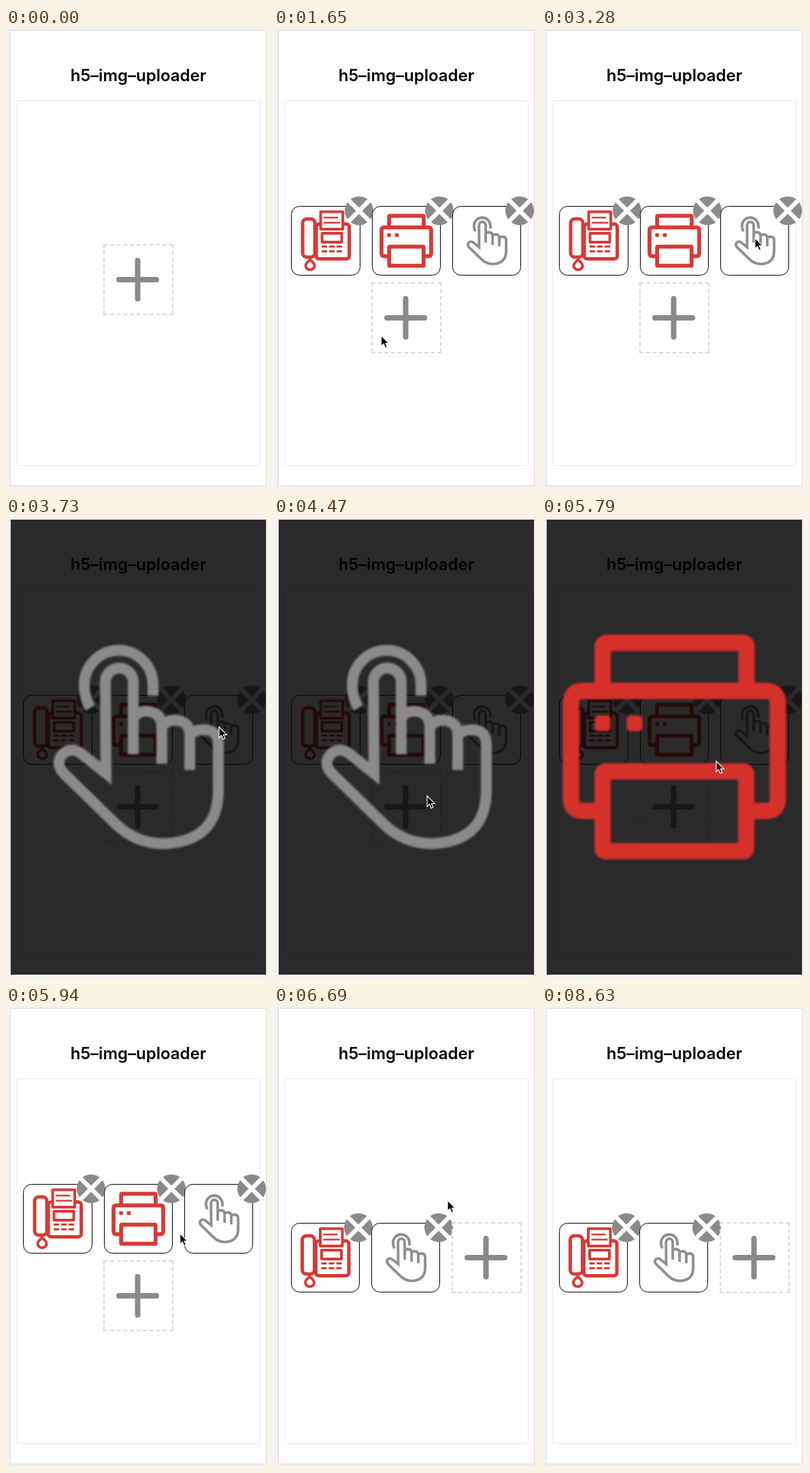
Write an HTML page that moves like this. It is 385 px wide and 676 px high and loops after 8.75 s.

```html
<!DOCTYPE html>
<html lang="en">
<head>
<meta charset="utf-8">
<title>h5-img-uploader</title>
<style>
html, body { margin: 0; width: 100%; height: 100%; overflow: hidden; background: #f2f2f2; }
svg { display: block; width: 385px; height: 676px; }
.title { font: 600 24px Inter, "Noto Sans", sans-serif; text-anchor: middle; fill: #000; }
.grey { fill: none; stroke: #8a8a8a; }
.red { fill: none; stroke: #d6302b; }
.zoomed { filter: blur(1.5px); }
.card { fill: #fefefe; stroke: #000; }
</style>
</head>
<body>
<svg viewBox="0 0 385 676">
  <defs>
    <g id="printer" class="red" stroke-width="24" stroke-linejoin="round">
      <path d="M-105.5 -82V-146Q-105.5 -152.500 -99 -152.500H100Q106 -152.500 106 -146V-82"/>
      <path d="M-106 94H-134Q-152 94 -152 76V-64Q-152 -82 -134 -82H134Q152 -82 152 -64V76Q152 94 134 94H106"/>
      <rect x="-105.5" y="36" width="211" height="117" rx="4"/>
      <path stroke-width="10" d="M-112 -41h13v13h-13zM-65 -41h13v13h-13z" fill="#d6302b"/>
    </g>
    <g id="hand" class="grey" stroke-width="16" transform="translate(-194.5 -337)">
      <path d="M124 280Q115 265 115 246A50.500 50.500 0 0 1 216 246V262"/>
      <path d="M187 348V242A20.500 20.500 0 0 0 146 242L147 376L112 348Q97 336 84 347Q71 361 85 376L160 449Q190 479 232 479Q312 476 312 400V332Q311 312 291 312Q276 312 270 320"/>
      <path d="M187 295Q193 285 206 285Q229 286 229 308V362M229 308Q235 298 248 298Q270 299 270 320V371"/>
    </g>
    <g id="fax" class="red" stroke-width="5" stroke-linejoin="round" transform="translate(-76 -312)">
      <rect x="42" y="280" width="18" height="56" rx="6"/>
      <rect x="62" y="287.500" width="48.500" height="51" rx="4"/>
      <path stroke-width="4" fill="#fefefe" d="M68.500 295V269.500H101V295Z"/>
      <path stroke-width="2.500" d="M73 278H94M73 285.500H97"/>
      <rect x="70.500" y="301" width="29" height="13" stroke-width="4"/>
      <path stroke-width="3" d="M70 320.500h8m3 0h8m3 0h8M70 327.500h8m3 0h8m3 0h8"/>
      <path stroke-width="4" d="M53 335V340Q46.500 345 46.500 348.500A6.500 6 0 0 0 59.500 348.500Q59.500 345 53 340"/>
    </g>
    <g id="remove">
      <circle r="21" fill="#8a8a8a"/>
      <path d="M-15 -15L15 15M15 -15L-15 15" stroke="#fefefe" stroke-width="6.500"/>
    </g>
    <g id="add">
      <path d="M-51.500 -51H51.500M-51.500 51H51.500M-50.500 -52V52M50.500 -52V52" stroke="#d8d8d8" stroke-width="2" stroke-dasharray="6 3.700"/>
      <path class="grey" stroke-width="8" stroke-linecap="round" d="M-28.500 0H26.500M-1 -28V28"/>
    </g>
  </defs>
  <rect x="6.500" y="3.500" width="376" height="668" fill="#fefefe" stroke="#dcdcdc"/>
  <text class="title" x="194.500" y="78">h5–img–uploader</text>
  <rect x="15.500" y="106.500" width="358" height="535" fill="none" stroke="#ececec"/>
  <g id="items"></g>
  <g id="preview">
    <rect x="7" y="4" width="375" height="667" fill="#000" fill-opacity=".835"/>
    <g class="zoomed" transform="translate(194.5 337)"><use id="previewIcon"/></g>
  </g>
  <path id="cursor" d="M0 0V15.500L3.600 12.200L6 18L8.800 16.800L6.400 11.300H11.300Z" fill="#000" stroke="#fff" stroke-width="1.200"/>
</svg>
<script>
const LOOP = 8750, STEP = 147;
const CENTER = { x: 194.5, y: 369 }, COLUMN = 118.4, ROW = 113;
const CARD = { width: 100.55, height: 101 };
const $ = id => document.getElementById(id);
const translate = (x, y) => `translate(${x} ${y})`;

const ALL = ['fax', 'printer', 'hand'];
const scenes = [
  { start: 0, icons: [] },
  { start: 1350, icons: ALL },
  { start: 3730, icons: ALL, preview: 'hand' },
  { start: 4760, icons: ALL },
  { start: 5350, icons: ALL, preview: 'printer' },
  { start: 5940, icons: ALL },
  { start: 6690, icons: ['fax', 'hand'] }
];

// The pointer rests at each goal until the next move begins.
const moves = [
  { start: 1350, steps: 6, x: 55, y: 450 },
  { start: 2690, steps: 5, x: 313, y: 308 },
  { start: 4030, steps: 4, x: 225, y: 409 },
  { start: 4910, steps: 2, x: 233, y: 377 },
  { start: 5200, steps: 5, x: 256, y: 358 },
  { start: 5940, steps: 3, x: 255, y: 285 },
  { start: 6840, steps: 4, x: 318, y: 530 },
  { start: 7430, steps: 1, x: 341, y: 656 },
  { start: 8330, steps: 2, x: 342, y: 664 }
];
const pointerShown = t => (t >= 1350 && t < 7430) || (t >= 8330 && t < 8630);

function card(icon, x, y) {
  const left = Math.floor(x - 50.5) + 0.5;
  const right = Math.floor(x - 50.5 + CARD.width) + 0.5;
  const top = y - 50.5;
  const scale = icon === 'fax' ? 1 : 0.24;
  return `<rect class="card" x="${left}" y="${top}" width="${right - left}" height="${CARD.height}" rx="12"/>
    <use href="#${icon}" opacity=".95" transform="${translate(x, y)} scale(${scale})"/>
    <use href="#remove" transform="${translate(right - 1.5, top + 6.5)}"/>`;
}

// Centred rows of three; the add button takes the last place.
function layOut(icons) {
  const rows = Math.ceil((icons.length + 1) / 3);
  return [...icons, 'add'].map((icon, i) => {
    const row = Math.floor(i / 3);
    const inRow = Math.min(3, icons.length + 1 - row * 3);
    const x = CENTER.x + (i % 3 - (inRow - 1) / 2) * COLUMN;
    const y = Math.floor(CENTER.y + (row - (rows - 1) / 2) * ROW);
    if (icon === 'add') return `<use href="#add" transform="${translate(Math.floor(x) + 0.5, y)}"/>`;
    return card(icon, inRow === 3 && row === rows - 1 ? x - 0.6 : x, y);
  }).join('');
}

function pointerAt(t) {
  let x = 260, y = 452;
  for (const move of moves) {
    if (t < move.start) break;
    const done = Math.min(1, (Math.floor((t - move.start) / STEP) + 1) / move.steps);
    x += (move.x - x) * done;
    y += (move.y - y) * done;
  }
  return translate(x, y);
}

let shown;
function render(t) {
  const scene = scenes.findLast(({ start }) => start <= t);
  if (scene !== shown) {
    shown = scene;
    $('items').innerHTML = layOut(scene.icons);
    $('preview').style.display = scene.preview ? '' : 'none';
    if (scene.preview) $('previewIcon').setAttribute('href', '#' + scene.preview);
  }
  $('cursor').style.display = pointerShown(t) ? '' : 'none';
  $('cursor').setAttribute('transform', pointerAt(t));
}

const begin = performance.now();
function tick() {
  render((performance.now() - begin) % LOOP);
  requestAnimationFrame(tick);
}
tick();
</script>
</body>
</html>
```
